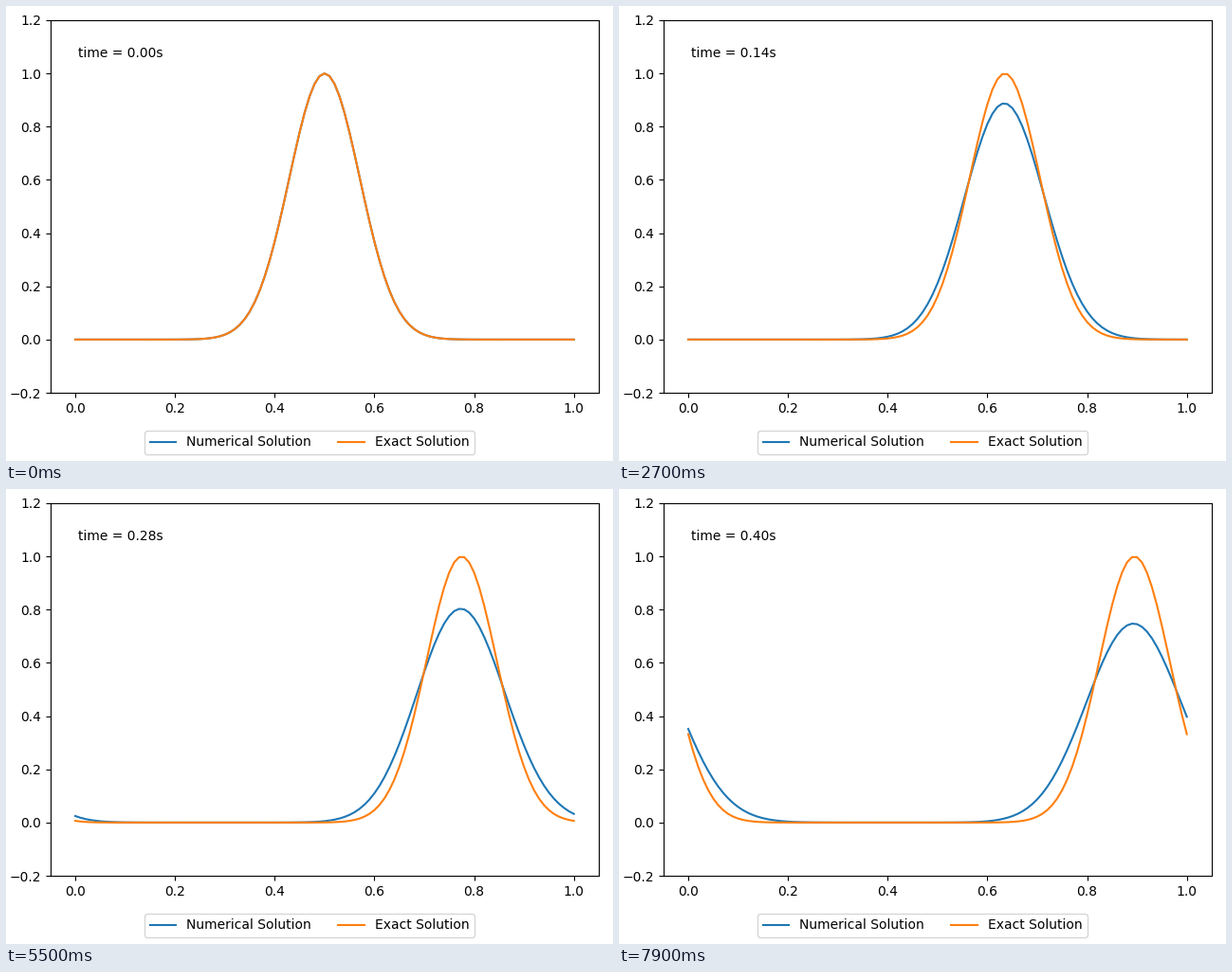
A matplotlib script for the animation above (8 s loop, 640 by 480 pixels).

```python
import numpy as np
import matplotlib.pyplot as plt
from matplotlib.animation import FuncAnimation

N = 101
FRAMES = 80
DT = 0.005
SPEED = 1.0

x = np.linspace(0, 1, N)
dx = x[1] - x[0]


def exact(t):
    return np.exp(-100 * ((x - SPEED * t) % 1.0 - 0.5) ** 2)


def rate(u):
    """First-order upwind advection on a periodic grid."""
    return -SPEED * (u - np.roll(u, 1)) / dx


def rk4(u):
    k1 = rate(u)
    k2 = rate(u + DT / 2 * k1)
    k3 = rate(u + DT / 2 * k2)
    k4 = rate(u + DT * k3)
    return u + DT / 6 * (k1 + 2 * k2 + 2 * k3 + k4)


start = np.exp(-100 * (x - 0.5) ** 2)
history = [start]
for _ in range(FRAMES - 1):
    history.append(rk4(history[-1]))

fig, ax = plt.subplots(figsize=(6.4, 4.8), dpi=100)
numeric, = ax.plot(x, start, label="Numerical Solution")
analytic, = ax.plot(x, start, label="Exact Solution")
fig.tight_layout()
fig.subplots_adjust(bottom=0.15)
ax.set_ylim(-0.2, 1.2)
fig.legend(loc="lower center", ncol=2)
clock = ax.text(0.05, 0.9, "", transform=ax.transAxes)


def update(i):
    t = i * DT
    numeric.set_ydata(history[i])
    analytic.set_ydata(exact(t) if i else start)
    clock.set_text(f"time = {t:.2f}s")
    return numeric, analytic, clock


anim = FuncAnimation(fig, update, frames=FRAMES, interval=100, repeat=True)
plt.show()
```
